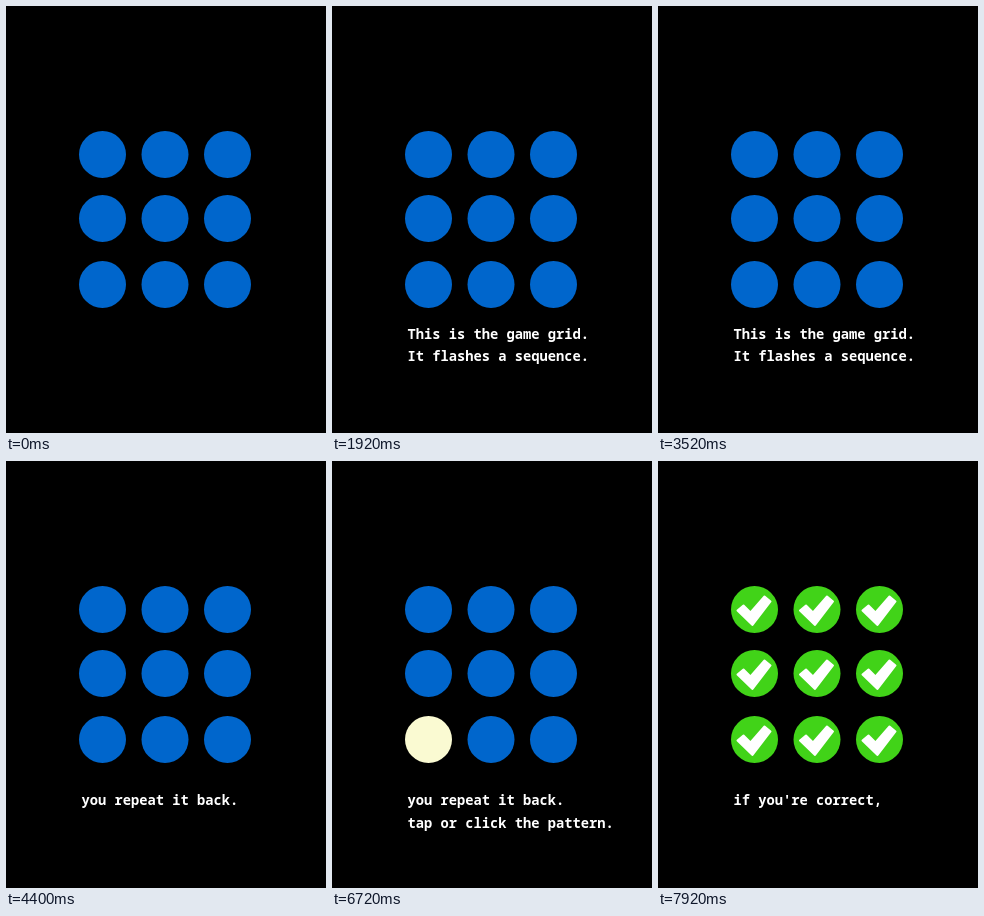
Recreate the animation shown at these times as an HTML page. Size 320 by 427 pixels, loop 8 s.

```html
<!DOCTYPE html>
<html lang="en">
<head>
<meta charset="utf-8">
<title>Memory grid tutorial</title>
<style>
  html, body { margin: 0; height: 100%; overflow: hidden; background: #000; }
  svg { display: block; width: 100vw; height: 100vh; }
  text { font: 700 13.75px "Noto Sans Mono", "DejaVu Sans Mono", monospace; fill: #fff; white-space: pre; }
  .check { fill: #fff; stroke: #fff; stroke-width: 2; stroke-linejoin: round; }
</style>
</head>
<body>
<svg viewBox="0 0 320 427"></svg>
<script>
const LOOP = 8000, TICK = 80, CHAR_MS = 29, FLASH_MS = 160;
const BLUE = '#0066cc', CREAM = '#fafad2', GREEN = '#41d318';
const WIN = 7680, CHECK_START = 7760;

const svg = document.querySelector('svg');
function add(tag, attrs) {
  const el = document.createElementNS('http://www.w3.org/2000/svg', tag);
  for (const key in attrs) el.setAttribute(key, attrs[key]);
  return svg.appendChild(el);
}

// Each line types from start and is cleared at end.
const lines = [
  { text: 'This is the game grid.', y: 333, start: 227, end: 3680 },
  { text: 'It flashes a sequence.', y: 355, start: 1267, end: 3680 },
  { text: 'you repeat it back.', y: 344, start: 3790, end: 6960 },
  { text: 'tap or click the pattern.', y: 366.5, start: 4625, end: 6960 },
  { text: "if you're correct,", y: 344, start: 7042, end: LOOP }
];
for (const line of lines) line.el = add('text', { x: 75.5, y: line.y });

// Dots are numbered row by row from the top left.
const order = [3, 7, 5, 6];
const flashes = [[2320, 2640, 3040, 3360], [5760, 6080, 6400, 6720]];

const dots = [], checks = [];
for (const y of [148.5, 212.5, 278.5]) {
  for (const x of [96.5, 159, 221.5]) {
    dots.push(add('circle', { cx: x, cy: y, r: 23.5 }));
    checks.push(add('path', {
      class: 'check',
      d: 'M-17 1L-11-4L-4 3L10-13L16-8L-2 15.5Z',
      transform: `translate(${x} ${y})`
    }));
  }
}

function litDot(t) {
  for (const times of flashes) {
    const i = times.findIndex(on => t >= on && t < on + FLASH_MS);
    if (i >= 0) return order[i];
  }
  return -1;
}

function draw(t) {
  const lit = litDot(t);
  const fade = Math.min(1, Math.max(0, (t - CHECK_START) / 160));
  dots.forEach((dot, i) => dot.setAttribute('fill', t >= WIN ? GREEN : i === lit ? CREAM : BLUE));
  checks.forEach(check => check.setAttribute('opacity', fade));
  for (const { el, text, start, end } of lines) {
    const count = t < end ? Math.max(0, Math.floor((t - start) / CHAR_MS)) : 0;
    el.textContent = text.slice(0, count);
  }
}

const begin = performance.now();
function frame() {
  const t = (performance.now() - begin) % LOOP;
  draw(Math.floor(t / TICK + 0.01) * TICK % LOOP);
  requestAnimationFrame(frame);
}
frame();
</script>
</body>
</html>
```
